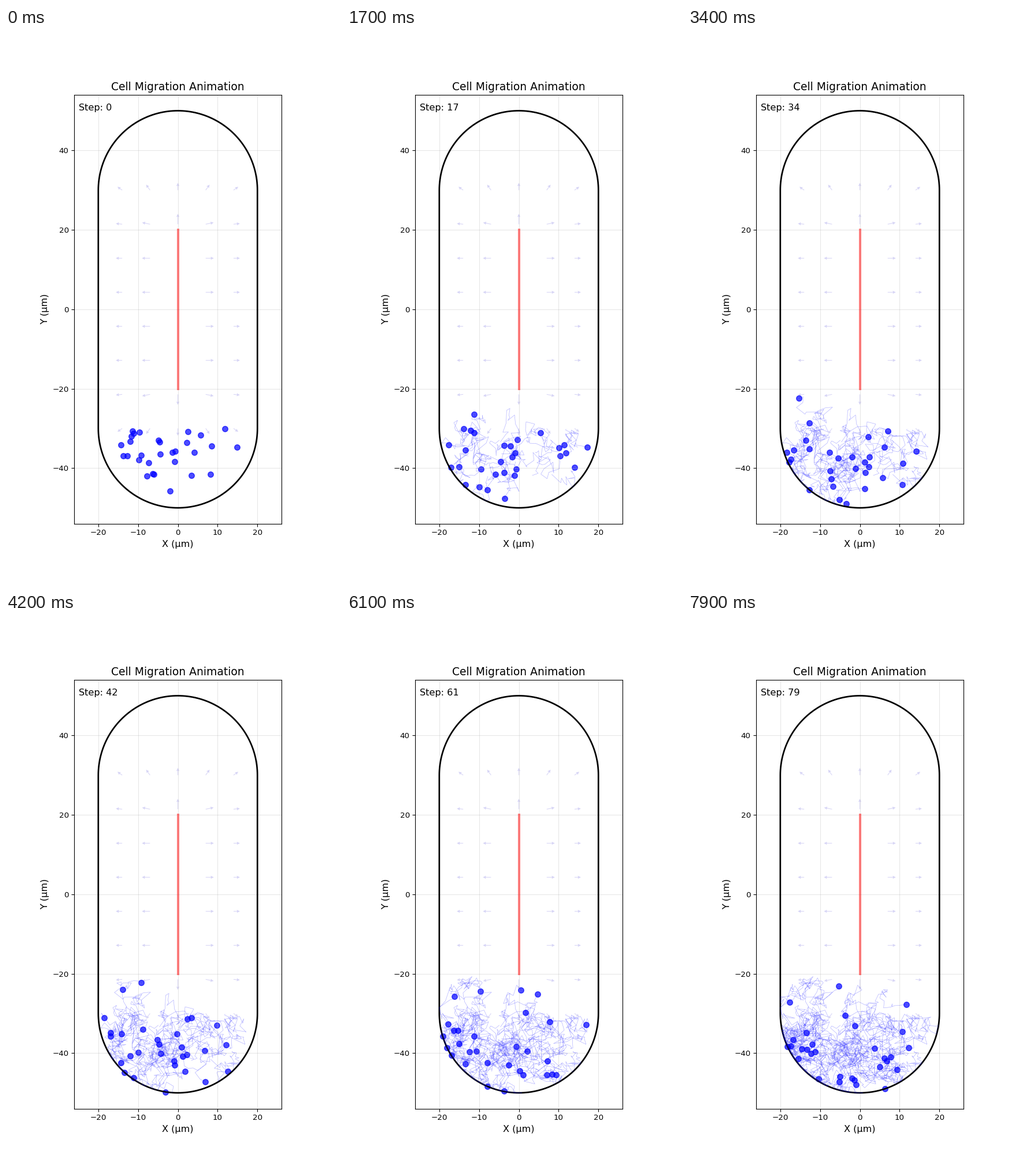
Animation, 580 px wide and 966 px high, one loop 8 s. Source, as a matplotlib script:

```python
import numpy as np
import matplotlib.pyplot as plt
from matplotlib.animation import FuncAnimation
from matplotlib.collections import LineCollection

STEPS, CELLS = 80, 30
RADIUS, HALF = 20, 30      # capsule: radius and half length of the straight part
ROD = 20                   # half length of the rod
DRIFT = (-0.05, -0.08)     # mean move per step
NOISE = 1.15               # random move per step and axis
K = 0.966                  # scale for sizes given in points


def confine(p):
    """Project points outside the capsule onto its wall."""
    core = np.column_stack([np.zeros(len(p)), p[:, 1].clip(-HALF, HALF)])
    out = p - core
    dist = np.hypot(*out.T)[:, None]
    return core + out * np.minimum(1, RADIUS / np.maximum(dist, 1e-9))


def below_front(p, step):
    """Mirror points that pass the slowly rising upper front."""
    front = -24 + 5 * step / STEPS - 0.35 * p[:, 0].clip(0)
    return np.column_stack([p[:, 0], front - np.abs(front - p[:, 1])])


def walk():
    """Random walks from the bottom cap, shape (cell, step, xy)."""
    rng = np.random.default_rng(11)
    r = 0.8 * RADIUS * np.sqrt(rng.random(CELLS))
    a = np.pi * (1 + rng.random(CELLS))
    path = [np.column_stack([r * np.cos(a), r * np.sin(a) - HALF])]
    for step in range(1, STEPS):
        move = rng.normal(DRIFT, NOISE, (CELLS, 2))
        path.append(confine(below_front(path[-1] + move, step)))
    return np.stack(path, axis=1)


def draw_field(ax):
    """Arrows pointing away from the rod, shorter with distance."""
    x, y = (a.ravel() for a in np.meshgrid(np.linspace(-14, 14, 5),
                                           np.linspace(-30, 30, 8)))
    dy = y - y.clip(-ROD, ROD)
    dist = np.hypot(x, dy)
    on = dist > 0
    x, y, dy, dist = x[on], y[on], dy[on], dist[on]
    size = 51.5 / (18.3 + dist) / dist
    ax.quiver(x, y, x * size, dy * size, angles="xy", scale_units="xy", scale=1,
              width=0.003, headwidth=5, headlength=5, headaxislength=4.5,
              color=(0.15, 0.1, 0.8), alpha=0.18, zorder=0.9)


def draw_capsule(ax):
    a = np.linspace(0, np.pi, 101)
    x, y = RADIUS * np.cos(a), RADIUS * np.sin(a) + HALF
    ax.fill(np.append(x, -x), np.append(y, -y), fill=False, ec="k",
            lw=2 * K, zorder=2)


plt.rcParams.update({"font.family": "DejaVu Sans", "font.size": 10 * K})
fig, ax = plt.subplots(figsize=(5.8, 9.66), dpi=100)
fig.subplots_adjust(left=0.1255, right=0.9005, bottom=0.11, top=0.88)
ax.set(xlim=(-26, 26), ylim=(-54, 54), aspect="equal",
       xticks=range(-20, 21, 10), yticks=range(-40, 41, 20))
ax.set_title("Cell Migration Animation", fontsize=14 * K)
ax.set_xlabel("X (µm)", fontsize=12 * K)
ax.set_ylabel("Y (µm)", fontsize=12 * K)
ax.grid(True, alpha=0.3)

draw_field(ax)
draw_capsule(ax)
ax.plot([0, 0], [-ROD, ROD], "r-", lw=3 * K, alpha=0.5)

paths = walk()
trails = LineCollection([], colors="blue", linewidths=0.5 * K, alpha=0.3, zorder=2)
ax.add_collection(trails, autolim=False)
cells = ax.scatter(*paths[:, 0].T, s=50 * K**2, c="blue", alpha=0.7)
label = ax.text(0.02, 0.98, "", transform=ax.transAxes, va="top", fontsize=12 * K)


def update(step):
    cells.set_offsets(paths[:, step])
    trails.set_segments(list(paths[:, :step + 1]))
    label.set_text(f"Step: {step}")
    return cells, trails, label


anim = FuncAnimation(fig, update, frames=STEPS, interval=100, repeat=True)
plt.show()
```
